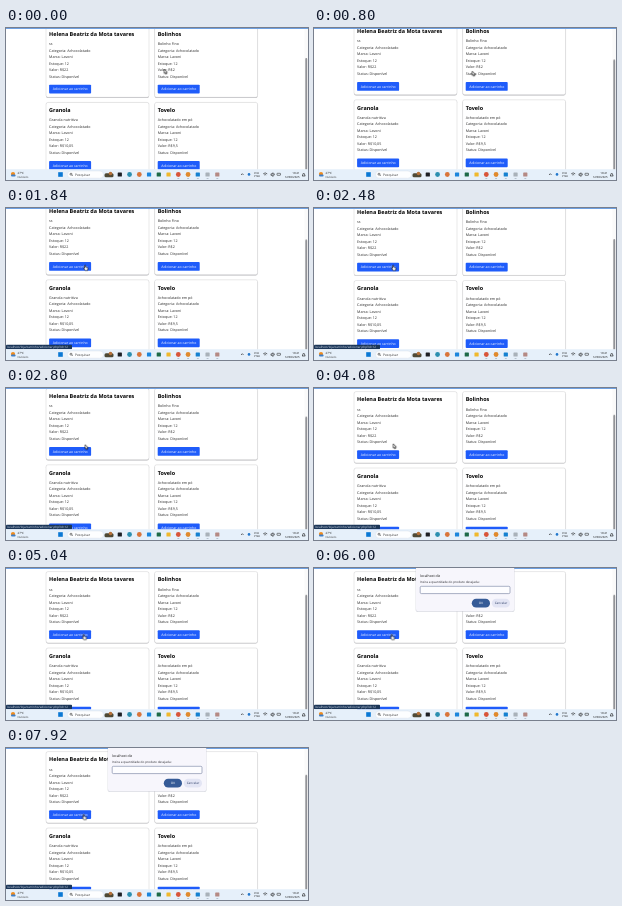
These frames come from a looping animation (302x152 px, 8 s). An HTML page:

```html
<!DOCTYPE html>
<html lang="pt-BR">
<head>
<meta charset="utf-8">
<title>Produtos</title>
<style>
html, body { margin: 0; width: 100%; height: 100%; overflow: hidden; background: #fff; }
svg { display: block; width: 302px; height: 152px; }
text { font-family: "Open Sans", "Noto Sans", sans-serif; text-rendering: geometricPrecision; }
</style>
</head>
<body>
<svg id="stage" viewBox="0 0 302 152"></svg>
<script>
const LOOP = 8000;
const stage = document.getElementById("stage");

function add(parent, tag, attrs = {}, content) {
  const el = document.createElementNS("http://www.w3.org/2000/svg", tag);
  for (const key in attrs) el.setAttribute(key, attrs[key]);
  if (content !== undefined) el.textContent = content;
  parent.appendChild(el);
  return el;
}
const rect = (p, x, y, width, height, fill, rx = 0, more = {}) =>
  add(p, "rect", { x, y, width, height, fill, rx, ...more });
const label = (p, x, y, size, fill, str, more = {}) =>
  add(p, "text", { x, y, "font-size": size, fill, ...more }, str);
const middle = { "text-anchor": "middle" };

// steps: [time, value, easing until the next step]
function play(el, prop, steps) {
  const frames = steps.map(([time, value, easing = "linear"]) =>
    ({ offset: time / LOOP, [prop]: value, easing }));
  frames.push({ offset: 1, [prop]: steps[steps.length - 1][1] });
  el.animate(frames, { duration: LOOP, iterations: Infinity });
}
const move = (x, y) => `translate(${x}px, ${y}px)`;
const HOLD = "step-end";

// Page
rect(stage, 0, 0, 302, 152, "#fff");
const page = add(stage, "g");

const products = [
  ["Helena Beatriz da Mota tavares", "ss", "Lavoni", "12", "R$22"],
  ["Bolinhos", "Bolinho Fino", "Lavoni", "12", "R$2"],
  ["Granola", "Granola nutritiva", "Lavoni", "12", "R$10,05"],
  ["Tovelo", "Achocolatado em pó", "Lavoni", "12", "R$9,5"]
];

function card(x, y, [name, info, brand, stock, price]) {
  const g = add(page, "g", { transform: `translate(${x} ${y})` });
  rect(g, 0, 0.4, 103, 71.6, "#b4b4b7", 2);
  rect(g, 0, 0, 103, 71.3, "#fff", 2, { stroke: "#d0d0d3", "stroke-width": 0.5 });
  label(g, 3.1, 9.9, 5.45, "#000", name, { "font-weight": 700 });
  const lines = [info, "Categoria: Achocolatado", "Marca: " + brand,
    "Estoque: " + stock, "Valor: " + price, "Status: Disponível"];
  lines.forEach((line, i) => label(g, 3.1, 19.1 + i * 6.5, 3.65, "#2a2a2a", line));
  rect(g, 3.1, 58.7, 42, 8.7, "#1f5cfa", 0.9);
  label(g, 24.2, 64.3, 3.5, "#fff", "Adicionar ao carrinho", middle);
}
products.forEach((item, i) =>
  card(i % 2 ? 148.6 : 40, i < 2 ? -2 : 74.4, item));

play(page, "transform", [
  [0, move(0, 0)],
  [80, move(0, 0), "ease-in-out"],
  [640, move(0, -2.6)],
  [1840, move(0, -2.6), "ease-in-out"],
  [2240, move(0, -1.9)],
  [2640, move(0, -1.9), "ease-out"],
  [3040, move(0, 5.6)]
]);

// Window edge and scrollbar
rect(stage, 0, 0, 302, 1, "#6ea0e2");
rect(stage, 298.4, 1, 3.6, 140.2, "#fafafa");
const thumb = rect(stage, 299.3, 30, 1.9, 116, "#929397", 0.9);
play(thumb, "transform", [
  [0, move(0, 0)],
  [80, move(0, 0), "ease-in-out"],
  [640, move(0, 1.5)],
  [1840, move(0, 1.5), "ease-in-out"],
  [2240, move(0, 1.1)],
  [2640, move(0, 1.1), "ease-out"],
  [3040, move(0, -3.2)]
]);

// Link hint
const hint = add(stage, "g");
rect(hint, 0, 136.8, 66, 4.5, "#1b3658", 0.8);
label(hint, 1, 140.1, 3, "#dfe8f4", "localhost/loja/carrinho/adicionar.php?id=12");
play(hint, "opacity", [[0, 0, HOLD], [1680, 1, HOLD]]);

// Taskbar
const bar = add(stage, "g");
rect(bar, 0, 141.2, 302, 10.8, "#e6f0fa");
add(bar, "circle", { cx: 7, cy: 146, r: 2.1, fill: "#f08c1e" });
rect(bar, 5, 146.6, 4.6, 2, "#3f7fc8", 1);
label(bar, 11.5, 146, 2.9, "#111", "27°C");
label(bar, 11.5, 149.5, 2.7, "#444", "Nublado");
rect(bar, 52.2, 144.2, 4.6, 4.6, "#0a78d4");
rect(bar, 61.5, 143, 36, 7.2, "#fdfeff", 3.6, { stroke: "#c8d4e0", "stroke-width": 0.3 });
add(bar, "circle", { cx: 65, cy: 146.2, r: 1, fill: "none", stroke: "#111", "stroke-width": 0.5 });
add(bar, "path", { d: "M65.7 146.9l1.1 1.1", stroke: "#111", "stroke-width": 0.5 });
label(bar, 69, 147.7, 3.3, "#333", "Pesquisar");
rect(bar, 98.5, 145.2, 9, 4, "#4f4a36", 1.5);
add(bar, "circle", { cx: 104.5, cy: 145.5, r: 1.8, fill: "#b5713a" });
const icons = ["#1c1f24", "#2b8fb0", "#d9753a", "#1c86dc", "#1f6a48",
  "#f0b92e", "#d8553a", "#e08a2e", "#1581d0", "#a9b2ba", "#b58a84"];
icons.forEach((fill, i) => {
  const x = 113.8 + i * 9.75;
  if ([1, 2, 6, 7].includes(i)) add(bar, "circle", { cx: x, cy: 146.5, r: 2.4, fill });
  else rect(bar, x - 2.1, 144.4, 4.2, 4.2, fill, 0.6);
  if (i > 5) rect(bar, x - 1, 150.3, 2, 0.5, "#8290a0", 0.2);
});
const line = { fill: "none", stroke: "#111", "stroke-width": 0.6 };
add(bar, "path", { d: "M235 147l1.3-1.3 1.3 1.3", ...line });
add(bar, "circle", { cx: 243, cy: 146.4, r: 1.3, fill: "#2277cc" });
label(bar, 248, 146, 2.5, "#111", "POR");
label(bar, 248, 149.4, 2.5, "#111", "PTB2");
add(bar, "path", { d: "M257.2 145.8q2-1.8 4 0M258.2 147q1-.9 2 0", ...line });
add(bar, "path", { d: "M265 145.8h.8l1.3-1v3.6l-1.3-1h-.8zM268 145.4q.8 1 0 2", ...line });
rect(bar, 271, 145.3, 3.5, 2, "none", 0.4, { stroke: "#111", "stroke-width": 0.5 });
label(bar, 293.5, 146, 2.8, "#111", "10:41", { "text-anchor": "end" });
label(bar, 293.5, 149.6, 2.8, "#111", "12/06/2025", { "text-anchor": "end" });
add(bar, "path", { d: "M296.2 148h3l-.6-1v-1q-.9-1.8-1.8 0v1z", ...line });

// Prompt
const prompt = add(stage, "g");
rect(prompt, 101.6, -4, 99, 48, "#8990a4", 2.6, { opacity: 0.3 });
rect(prompt, 102, -4, 98.2, 47.3, "#f7f6fc", 2.4);
label(prompt, 106, 8.6, 3.5, "#111", "localhost diz");
label(prompt, 106, 15.3, 3.1, "#2a2b30", "Insira a quantidade do produto desejada:");
rect(prompt, 106.2, 18.3, 89.8, 7.3, "#fdfdff", 1.2, { stroke: "#56648a", "stroke-width": 0.5 });
rect(prompt, 157.8, 30.8, 18.2, 8.8, "#365b97", 4.4);
label(prompt, 166.9, 36.3, 3.1, "#fff", "OK", middle);
rect(prompt, 177.8, 30.8, 18.2, 8.8, "#e3e5f4", 4.4);
label(prompt, 186.9, 36.3, 3.1, "#2c3d66", "Cancelar", middle);
play(prompt, "opacity", [[0, 0, HOLD], [5280, 1, HOLD]]);

// Pointer
const pointer = add(stage, "g");
const ink = { fill: "#fff", stroke: "#000", "stroke-width": 0.6, "stroke-linejoin": "round" };
const arrow = add(pointer, "path", { d: "M0 0v4.3l1-.9.7 1.6.8-.4-.7-1.5h1.4z", ...ink });
const hand = add(pointer, "path", {
  d: "M-.4 .2q.5-.6 1 0v1.7l2 .5q.5.2.4.8l-.4 2h-2.5l-1.6-2q.1-.7.7-.4l.4.4z", ...ink
});
play(pointer, "transform", [
  [0, move(158.2, 41.2)],
  [80, move(158.2, 41.2), "ease-in-out"],
  [640, move(158.2, 43.2)],
  [960, move(158.2, 43.2), "ease-in-out"],
  [1760, move(79, 57.2)],
  [2720, move(79, 57.2), "ease-out"],
  [3040, move(79.2, 55.8)],
  [4240, move(79.2, 55.8), "ease-in-out"],
  [4640, move(77.6, 66.4)]
]);
const handTimes = [[0, 0], [1680, 1], [2800, 0], [4480, 1]];
play(hand, "opacity", handTimes.map(([time, on]) => [time, on, HOLD]));
play(arrow, "opacity", handTimes.map(([time, on]) => [time, 1 - on, HOLD]));
</script>
</body>
</html>
```
